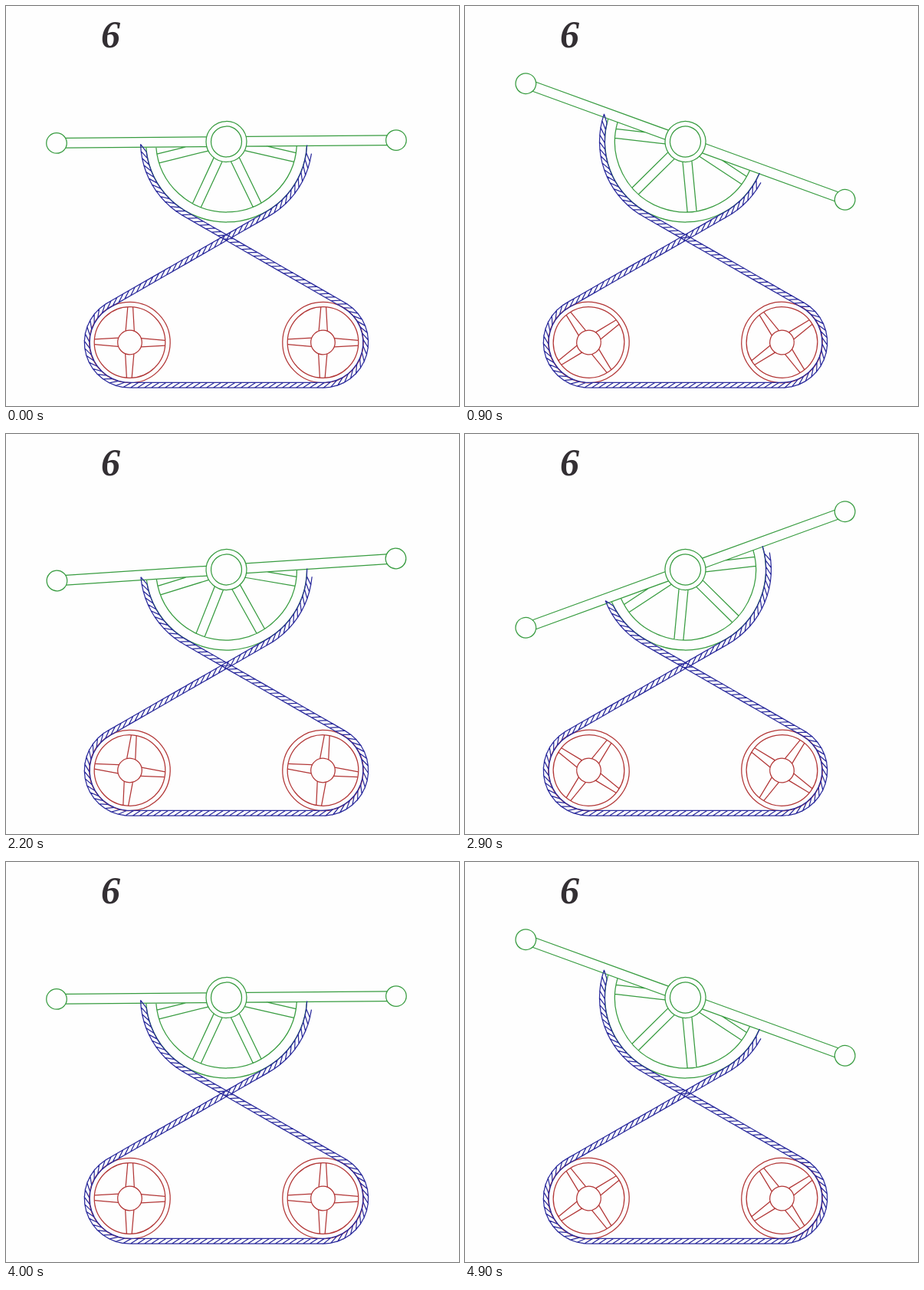
An HTML page for the animation above (5.1 s loop, 591x522 px).

```html
<!DOCTYPE html>
<html lang="en">
<head>
<meta charset="utf-8">
<title>Rocking beam and crossed rope</title>
<style>
  html, body { margin: 0; width: 100%; height: 100%; overflow: hidden; background: #fefefe; }
  svg { display: block; width: 591px; height: 522px; }
  path, circle { fill: none; stroke-width: 1.25; }
  .beam { stroke: #389c40; }
  .wheel { stroke: #b23636; }
  .rope { stroke: #2a2a9c; }
  text { font: italic bold 50px "Liberation Serif", Times, serif; fill: #332f33; }
</style>
</head>
<body>
<svg viewBox="0 0 591 522">
  <text x="124" y="54.3">6</text>
  <g class="beam" id="beam"></g>
  <g class="wheel" id="left"></g>
  <g class="wheel" id="right"></g>
  <path class="rope" id="rope"/>
</svg>
<script>
const $ = id => document.getElementById(id);
const rad = deg => deg * Math.PI / 180;
const fix = n => n.toFixed(2);
const clamp = (v, m) => Math.max(-m, Math.min(m, v));

const hub = { x: 287.5, y: 177, r: 108.6 };
const wheels = { left: { x: 161.5, y: 439, r: 55.8 }, right: { x: 413.5, y: 439, r: 55.8 } };

const line = (a, b) => `M${fix(a[0])} ${fix(a[1])}L${fix(b[0])} ${fix(b[1])}`;
const ring = (r, x = 0) => `<circle cx="${x}" r="${r}"/>`;
const shape = d => `<path d="${d}"/>`;

// Point at distance r along a ray, shifted sideways by w
function ray(deg, r, w) {
  const c = Math.cos(rad(deg)), s = Math.sin(rad(deg));
  return [r * c - w * s, r * s + w * c];
}

function drawBeam() {
  const bar = 6.4, ball = 221.5, half = 6, rim = 92, hubR = 26.5;
  const cut = (r, w) => Math.sqrt(r * r - w * w);
  let d = '';
  for (const side of [-1, 1])
    for (const y of [-bar, bar])
      d += line([side * cut(hubR, bar), y], [side * (ball - cut(13.3, bar)), y]);
  for (const r of [rim, 105]) {
    const x = cut(r, bar);
    d += `M${x} ${bar}A${r} ${r} 0 0 1 ${-x} ${bar}`;
  }
  for (const deg of [13.4, 64.6, 115.4, 166.6])
    for (const w of [-half, half]) {
      const s = Math.sin(rad(deg)), c = Math.cos(rad(deg));
      const start = Math.max(cut(hubR, half), (bar - w * c) / s);
      d += line(ray(deg, start, w), ray(deg, cut(rim, half), w));
    }
  $('beam').innerHTML = shape(d) + ring(hubR) + ring(20) + ring(13.3, -ball) + ring(13.3, ball);
}

function drawWheel(id) {
  let d = '';
  for (let deg = 0; deg < 360; deg += 90)
    for (const side of [-1, 1])
      d += line(ray(deg, 14.8, side * 5.6), ray(deg, 46, side * 3.4));
  $(id).innerHTML = shape(d) + ring(52.7) + ring(46.3) + ring(15.8);
}

// Rope route: arcs around the hub and wheels joined by tangents
const dx = wheels.right.x - hub.x, dy = wheels.right.y - hub.y;
const slope = Math.atan2(dy, dx) - Math.asin((hub.r + wheels.right.r) / Math.hypot(dx, dy));
const leave = slope + Math.PI / 2;

const on = (c, a, h = 0) => [c.x + (c.r + h) * Math.cos(a), c.y + (c.r + h) * Math.sin(a)];

function arc(c, a, b) {
  const dir = Math.sign(b - a);
  return { len: Math.abs(b - a) * c.r, at: (s, h) => on(c, a + dir * s / c.r, dir * h) };
}

function straight(p, q) {
  const len = Math.hypot(q[0] - p[0], q[1] - p[1]);
  const ux = (q[0] - p[0]) / len, uy = (q[1] - p[1]) / len;
  return { len, at: (s, h) => [p[0] + ux * s + uy * h, p[1] + uy * s - ux * h] };
}

function route(angle) {
  const { left, right } = wheels, pi = Math.PI;
  const a = rad(angle);
  return [
    arc(hub, rad(178.8) + a, leave),
    straight(on(hub, leave), on(right, leave - pi)),
    arc(right, leave - pi, pi / 2),
    straight(on(right, pi / 2), on(left, pi / 2)),
    arc(left, pi / 2, 2 * pi - leave),
    straight(on(left, 2 * pi - leave), on(hub, pi - leave)),
    arc(hub, pi - leave, rad(3.7) + a)
  ];
}

function ropePath(angle) {
  const parts = route(angle), half = 3.4, slant = 10.5;
  const total = parts.reduce((sum, p) => sum + p.len, 0);
  const count = Math.round((total - slant) / 9);
  const pitch = (total - slant) / count;
  const at = (s, h) => {
    let i = 0;
    while (i < parts.length - 1 && s > parts[i].len) s -= parts[i++].len;
    return parts[i].at(s, h);
  };
  const edge = (s, h) => {
    const p = at(s, h), q = at(s + pitch, h);
    return line(p, [q[0] + (q[0] - p[0]) * .16, q[1] + (q[1] - p[1]) * .16]);
  };
  let d = '';
  for (let i = 0; i < count; i++) {
    const s = i * pitch;
    d += line(at(s, -half), at(s + slant, half)) + edge(s, -half) + edge(s + slant, half);
  }
  return d;
}

// Beam angle for each tenth of a second, resting at both ends
function tilt(k) {
  if (k < 13) return clamp(2.5 * k - 0.5, 20);
  if (k < 33) return clamp(21.25 - 2.5 * (k - 12), 20);
  return clamp(2.5 * (k - 32) - 20.5, 20);
}

function turn(id, c, angle) {
  $(id).setAttribute('transform', `translate(${c.x} ${c.y}) rotate(${angle})`);
}

function pose(angle) {
  turn('beam', hub, angle);
  for (const id in wheels) turn(id, wheels[id], -1.76 * angle);
  $('rope').setAttribute('d', ropePath(angle));
}

drawBeam();
Object.keys(wheels).forEach(drawWheel);

const start = performance.now();
let last = -1;
function tick() {
  const t = Math.max(0, performance.now() - start) % 5100;
  const k = Math.floor(t / 100);
  if (k !== last) pose(tilt(last = k));
  requestAnimationFrame(tick);
}
tick();
</script>
</body>
</html>
```
